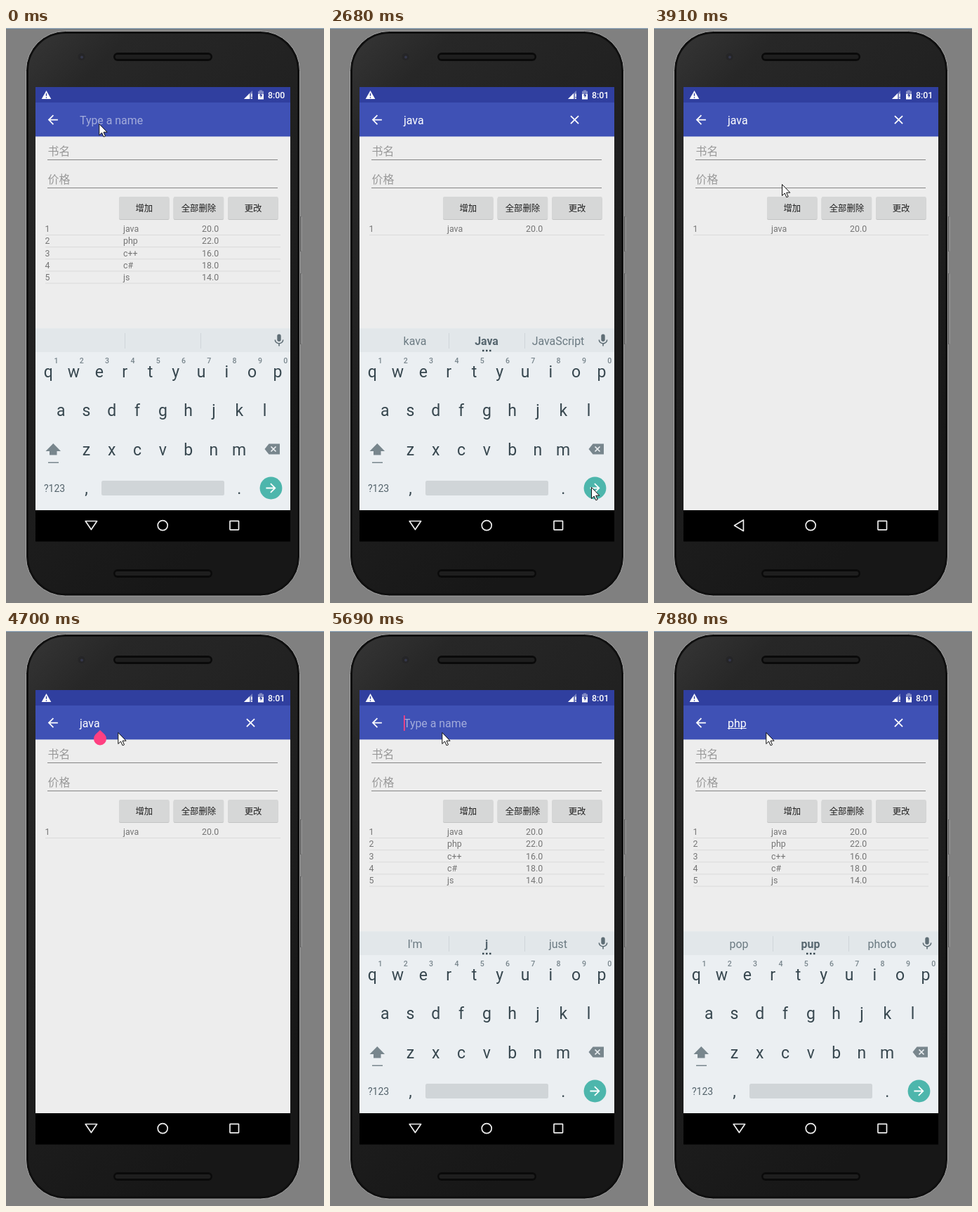
An HTML page for the animation above (8000 ms loop, 453 by 818 pixels).

```html
<!DOCTYPE html>
<html lang="zh">
<head>
<meta charset="utf-8">
<title>Book list search</title>
<style>
html, body { margin: 0; width: 100%; height: 100%; overflow: hidden; background: #808080; }
svg { display: block; width: 453px; height: 818px; font-family: Roboto, "Noto Sans CJK SC", "Noto Sans CJK", sans-serif; }
.mid { text-anchor: middle; }
.field { font-size: 15.9px; fill: #999; }
.small { font-size: 12.36px; }
.row { font-size: 12.36px; fill: #757575; }
.key { font-size: 23px; fill: #37474f; }
.digit { font-size: 10.6px; font-weight: 500; fill: #78858c; }
.word { font-size: 15.9px; fill: #6b7a82; }
.query { font-size: 15.9px; }
</style>
</head>
<body>
<svg viewBox="0 0 453 818" xmlns="http://www.w3.org/2000/svg">
  <defs>
    <linearGradient id="shell" x1="0" y1="0" x2=".5" y2="1">
      <stop offset="0" stop-color="#363636"/>
      <stop offset=".15" stop-color="#272727"/>
      <stop offset="1" stop-color="#171717"/>
    </linearGradient>
    <clipPath id="contentClip"><rect x="42" y="154.400" width="363" height="531.600"/></clipPath>
    <path id="arrow" d="M20 11H7.830l5.590-5.590L12 4l-8 8 8 8 1.410-1.410L7.830 13H20z" fill="#fff"/>
    <g id="speaker">
      <rect x="153" y="-6" width="141" height="12" rx="6" fill="#0a0a0a"/>
      <rect x="155.500" y="-3" width="136" height="6" rx="3" fill="#1e1e1e"/>
    </g>
  </defs>

  <rect width="453" height="818" fill="#808080"/>
  <rect width="453" height="1" fill="#9db1c1"/>
  <rect y="1" width="453" height="1" fill="#74808a"/>

  <!-- phone -->
  <path d="M419.500 268v50M419.500 349v101" stroke="#4a4a4a" stroke-width="2"/>
  <path d="M421 268.500v49M421 349.500v100" stroke="#a8a8a8"/>
  <rect x="28.500" y="4.500" width="390" height="803.500" rx="56" fill="#111" stroke="#a4a4a4"/>
  <rect x="31" y="7" width="385" height="798.500" rx="53.500" fill="url(#shell)" stroke="#0f0f0f" stroke-width="2"/>
  <use href="#speaker" y="41"/>
  <use href="#speaker" y="776"/>
  <circle cx="107.500" cy="41" r="5" fill="#252527"/>
  <circle cx="108" cy="41.500" r="2" fill="#34374a"/>

  <!-- screen -->
  <rect x="42" y="84" width="363" height="646.500" fill="#000"/>
  <rect x="42" y="84" width="363" height="22" fill="#303f9f"/>
  <rect x="42" y="154" width="363" height="532" fill="#ededed"/>
  <rect x="42" y="106" width="363" height="48.400" fill="#3f51b5"/>

  <g fill="#fff">
    <path d="M57.500 89 64.300 101H50.700Z"/>
    <path d="M57.500 93v3.800M57.500 98.200v1.500" stroke="#303f9f" stroke-width="1.400"/>
    <path d="M351 89V101H339Z" opacity=".35"/>
    <path d="M347 93V101H339Z"/>
    <path d="M350 93.500v4.500M350 99.300v1.700" stroke="#fff" stroke-width="1.500"/>
    <path d="M361 88.500h4v1.300h2V94h-8v-4.200h2Z" opacity=".4"/>
    <path d="M359 94h8v7.500h-8Z"/>
    <path d="M364 91.500 361 96.300h1.700V99.800L365.300 95H363.500Z" fill="#303f9f"/>
    <text id="clock" class="small" x="373" y="100" font-weight="500"></text>
    <use href="#arrow" transform="translate(56.200 120) scale(.883)"/>
    <path id="clear" transform="translate(337.900 120) scale(.883)" d="M19 6.410 17.590 5 12 10.590 6.410 5 5 6.410 10.590 12 5 17.590 6.410 19 12 13.410 17.590 19 19 17.590 13.410 12z"/>
    <text id="query" class="query" x="105" y="137"></text>
    <rect id="underline" x="105" y="138" height="1"/>
  </g>
  <text id="hint" class="query" x="105" y="137" fill="#a3acdb">Type a name</text>
  <rect id="caret" y="120" width="1.700" height="22"/>

  <g class="field"><text x="59.500" y="181">书名</text><text x="59.500" y="221">价格</text></g>
  <path d="M59 187.500H387M59 227.500H387" stroke="#858585"/>
  <g id="buttons"></g>
  <g id="list"></g>

  <!-- keyboard -->
  <g clip-path="url(#contentClip)">
    <g id="keyboard">
      <rect x="42" y="427.500" width="363" height="260" fill="#ebeff2"/>
      <rect x="42" y="427.500" width="363" height="33.500" fill="#e2e7ea"/>
      <path d="M169.500 434v22M277.500 434v22" stroke="#cfd5d9"/>
      <g fill="#5f6e76">
        <rect x="386.300" y="435.500" width="5.400" height="10.500" rx="2.700"/>
        <path d="M383.300 443.500a5.700 5.300 0 0 0 11.400 0M389 449v3.500" fill="none" stroke="#5f6e76" stroke-width="1.600"/>
      </g>
      <g id="words"></g>
      <path id="dots" d="M217 459h2.500m2.500 0h2.500m2.500 0h2.500" stroke="#37474f" stroke-width="2.400"/>
      <g id="keys"></g>
      <g fill="#78868d">
        <path d="M67.300 591 78 602H72.500V607.500H62V602H56.500Z"/>
        <rect x="60" y="617.500" width="15" height="1.500"/>
        <path d="M374.500 591.500H390V606.500H374.500L368.500 599Z"/>
        <path d="m377.500 595.500 7 7m0-7-7 7" stroke="#ebeff2" stroke-width="1.700"/>
      </g>
      <text x="54" y="659.500" font-size="14" fill="#55646c">?123</text>
      <rect x="136" y="644" width="175" height="21" rx="2.500" fill="#d0d5d8"/>
      <circle cx="377.500" cy="654.500" r="15.900" fill="#4db6ac"/>
      <use href="#arrow" transform="translate(388.100 643.900) scale(-.883 .883)"/>
    </g>
  </g>

  <g fill="none" stroke="#eee" stroke-width="1.700" stroke-linejoin="round">
    <path id="back"/>
    <circle cx="223.200" cy="707.600" r="7"/>
    <rect x="319" y="701.300" width="12.500" height="12.500" rx=".5"/>
  </g>

  <path id="handle" d="M134 141 140.400 147.100A9 9 0 1 1 127.600 147.100Z" fill="#ff4081"/>
  <path id="pointer" d="M.5.500V16.500L4.200 13 6.800 18.800 9.200 17.800 6.700 12.200H11.800Z" fill="#fff" stroke="#111" stroke-width="1"/>
</svg>

<script>
const LOOP = 8000;
const $ = id => document.getElementById(id);

function add(parent, tag, attrs, text = '') {
  const node = document.createElementNS('http://www.w3.org/2000/svg', tag);
  for (const name in attrs) node.setAttribute(name, attrs[name]);
  node.textContent = text;
  parent.append(node);
  return node;
}

const show = (node, on) => node.setAttribute('visibility', on ? 'inherit' : 'hidden');

['增加', '全部删除', '更改'].forEach((label, i) => {
  const x = 161 + i * 77.6;
  add($('buttons'), 'rect', { x, y: 241, width: 71.5, height: 32, rx: 2, fill: '#c3c4c4' });
  add($('buttons'), 'rect', { x, y: 240, width: 71.5, height: 32, rx: 2, fill: '#d6d7d7' });
  add($('buttons'), 'text', { x: x + 35.8, y: 261, class: 'small mid', fill: '#1f1f1f' }, label);
});

const rows = [['java', '20.0'], ['php', '22.0'], ['c++', '16.0'], ['c#', '18.0'], ['js', '14.0']].map(([name, price], i) => {
  const row = add($('list'), 'g', { transform: `translate(0 ${(i * 17.15).toFixed(2)})`, class: 'row' });
  add(row, 'text', { x: 55.5, y: 290.3 }, i + 1);
  add(row, 'text', { x: 167, y: 290.3 }, name);
  add(row, 'text', { x: 279, y: 290.3 }, price);
  add(row, 'rect', { x: 56, y: 294, width: 335, height: 1, fill: '#dadada' });
  return row;
});

[['qwertyuiop', 60.2, 497], ['asdfghjkl', 78.2, 552], ['zxcvbnm', 114.4, 608]].forEach(([letters, x0, y], line) => {
  [...letters].forEach((letter, i) => {
    const x = x0 + i * 36.3;
    add($('keys'), 'text', { x, y, class: 'key mid' }, letter);
    if (!line) add($('keys'), 'text', { x: x + 11.3, y: 477, class: 'digit mid' }, (i + 1) % 10);
  });
});
add($('keys'), 'text', { x: 114.4, y: 663, class: 'key mid' }, ',');
add($('keys'), 'text', { x: 332.3, y: 663, class: 'key mid' }, '.');

const words = [121, 223, 325].map((x, i) =>
  add($('words'), 'text', { x, y: 450.5, class: 'word mid', ...(i === 1 && { 'font-weight': 700, style: 'fill:#55656e' }) }));

const PINK = '#ff4081', FADED = '#8050b4', HIDDEN = 262;

// Each step lists only what changes at that time (ms).
const steps = [
  [0, { text: '', words: '', mark: true, caret: '', rows: 5, drop: 0, down: true, handle: false, clock: '8:00', at: [132.3, 136] }],
  [310, { caret: PINK }],
  [620, { text: 'j', words: "I'm j just" }],
  [760, { text: 'ja', words: 'January ja Jan' }],
  [900, { text: 'jav', words: 'have Java JavaScript' }],
  [1040, { text: 'java', words: 'kava Java JavaScript' }],
  [1630, { caret: '', at: [291.5, 351] }],
  [1750, { at: [325, 455] }],
  [1880, { at: [350, 560] }],
  [2010, { at: [366, 630] }],
  [2140, { caret: PINK, at: [372, 650] }],
  [2270, { clock: '8:01', at: [372, 653] }],
  [2680, { rows: 1, mark: false, caret: '' }],
  [2820, { drop: 100, down: false }],
  [2960, { drop: HIDDEN, at: [371, 646] }],
  [3100, { caret: PINK, at: [364.3, 630] }],
  [3220, { at: [352, 600] }],
  [3360, { at: [318, 530] }],
  [3500, { at: [268, 440] }],
  [3640, { caret: '', at: [217, 358] }],
  [3760, { at: [200, 295] }],
  [3890, { at: [182, 222] }],
  [4010, { at: [168, 170] }],
  [4140, { at: [159.3, 144], caret: PINK }],
  [4700, { caret: '', handle: true, down: true, words: 'Java java kava' }],
  [4820, { drop: 60, caret: PINK }],
  [4970, { drop: 0, mark: true }],
  [5260, { text: 'jav', handle: false, words: 'have Java JavaScript' }],
  [5400, { text: 'ja', words: 'January ja Jan' }],
  [5540, { text: 'j', words: "I'm j just" }],
  [5690, { text: '', rows: 5 }],
  [5840, { words: 'the I this' }],
  [6210, { text: 'p', words: 'pH p to' }],
  [6360, { text: 'pg' }],
  [6510, { words: 'pH of to', caret: FADED }],
  [6940, { text: 'p', caret: PINK }],
  [7080, { words: 'pH p to' }],
  [7210, { text: 'ph', words: 'photo ph phone' }],
  [7350, { text: 'php' }],
  [7480, { words: 'pop pup photo' }],
  [7880, { caret: '' }]
];

function draw(s) {
  $('query').textContent = s.text;
  const width = s.text ? $('query').getComputedTextLength() : 0;
  $('underline').setAttribute('width', s.mark ? width : 0);
  show($('hint'), !s.text);
  show($('clear'), s.text);
  show($('caret'), s.caret);
  $('caret').setAttribute('fill', s.caret || PINK);
  $('caret').setAttribute('x', Math.round(105 + width));
  const list = s.words.split(' ');
  words.forEach((word, i) => word.textContent = list[i] || '');
  show($('dots'), s.words);
  rows.forEach((row, i) => show(row, i < s.rows));
  $('keyboard').setAttribute('transform', `translate(0 ${s.drop})`);
  show($('keyboard'), s.drop < HIDDEN);
  $('back').setAttribute('d', s.down ? 'M113.2 701.500H129.600L121.400 713.600Z' : 'M127.400 700V715.400L114.500 707.700Z');
  show($('handle'), s.handle);
  $('clock').textContent = s.clock;
  $('pointer').setAttribute('transform', `translate(${s.at})`);
}

let current = -1;
function tick() {
  const time = performance.now() % LOOP;
  const index = steps.filter(([start]) => start <= time).length - 1;
  if (index !== current) {
    current = index;
    draw(Object.assign({}, ...steps.slice(0, index + 1).map(step => step[1])));
  }
  requestAnimationFrame(tick);
}
tick();
</script>
</body>
</html>
```
